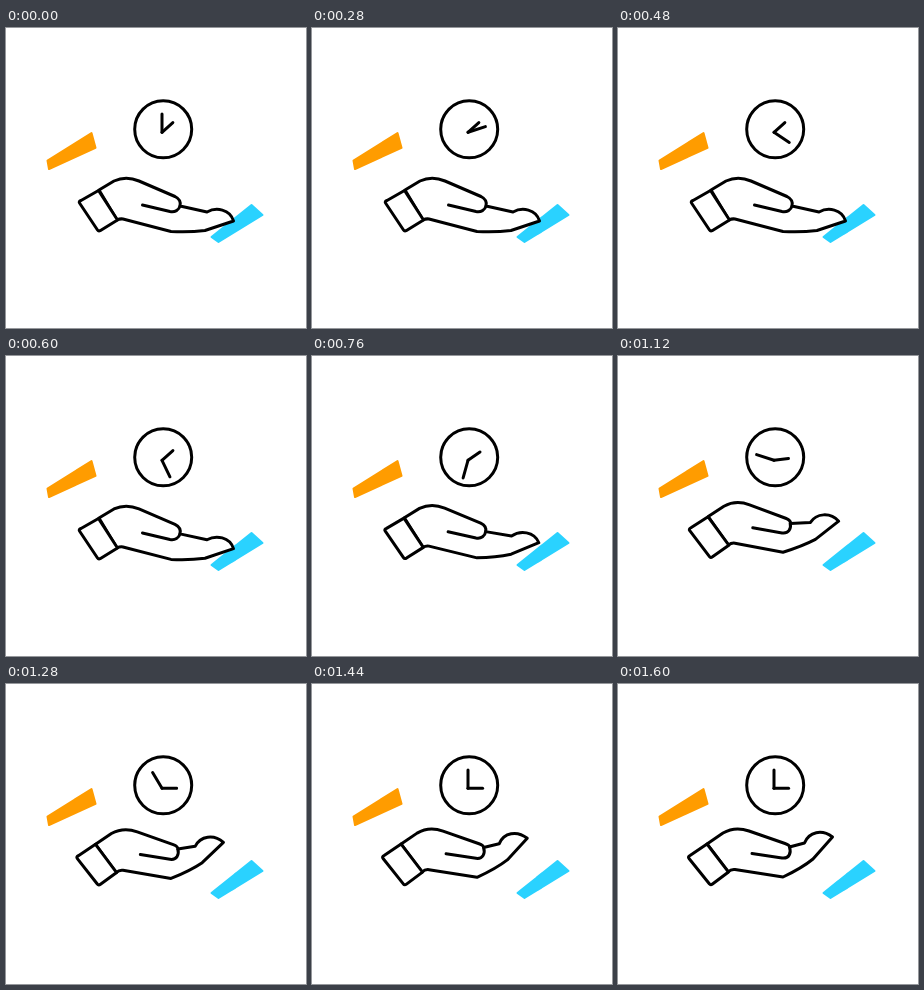
Write an HTML page that moves like this. It is 300 px wide and 300 px high and loops after 1640 ms.

```html
<!DOCTYPE html>
<html lang="en">
<head>
<meta charset="utf-8">
<title>Clock above a hand</title>
<style>
  html, body { margin: 0; width: 100%; height: 100%; overflow: hidden; background: #fff; }
  svg { display: block; width: 100vw; height: 100vh; }
  .line { stroke: #000; stroke-width: 3; stroke-linecap: round; stroke-linejoin: round; }
</style>
</head>
<body>
<svg viewBox="0 0 300 300">
  <g stroke-width="2" stroke-linejoin="round">
    <path fill="#ff9c00" stroke="#ff9c00" d="M41.5 132.5L85.5 105L89.5 119.8L43 141Z"/>
    <path fill="#2ad2ff" stroke="#2ad2ff" d="M205.5 209L212.5 214L256.5 187L245.5 177Z"/>
  </g>
  <g class="line" fill="#fff">
    <path id="palm"/>
    <path id="thumb" fill="none"/>
    <path id="cuff"/>
    <circle cx="157.2" cy="101.3" r="28.5"/>
    <path id="hour" d="M156 104.3V89.7"/>
    <path id="minute" d="M156 104.3V86"/>
  </g>
</svg>
<script>
const LOOP = 1640, STEP = 40;
const el = id => document.getElementById(id);
const clamp = v => Math.min(1, Math.max(0, v));
const smooth = u => u * u * (3 - 2 * u);

// Each part: lowered pose, raised pose
const poses = {
  palm: [
    "M93 162L108 153Q120 147.5 133 153L169 168.5C173 170.5 175 174 174 178L201 184C210 179 224 181 227.5 193L199 202.5Q183 204.5 165 203.5L117 191Q114 190.5 111 192Z",
    "M89 160L105 149Q117 142 131 147L167 159.5C170 160.5 172 162 171.5 163L186.5 159C191 147.5 204 145 214.5 153L195 175Q184 184 165 193L117 185.5Q113 185 110 188Z"
  ],
  thumb: [
    "M174 178C173 182 169 184.5 164 183.5L136.5 177",
    "M171.5 163C173.5 169 171 175 164 174L134 169.5"
  ],
  cuff: [
    "M75 172.5L92.5 162.5L111.5 192L94.5 202.5Q92.5 203.5 91.5 202L73.5 175Q72.5 173.5 75 172.5Z",
    "M72 171.5L89 160L110.5 188L94.5 200Q92.5 201.5 91.5 200L71 174.5Q69.5 173 72 171.5Z"
  ]
};

function blend(id, p) {
  const [low, high] = poses[id];
  const to = high.match(/[\d.]+/g);
  let i = 0;
  return low.replace(/[\d.]+/g, n => {
    const isX = i % 2 === 0;
    let v = +n + (to[i++] - n) * p;
    // fingers swing on an arc
    if (isX && id === "palm" && n > 176) v += 4 * p * (1 - p) * 2.6 * (n - 165) / 62;
    return v.toFixed(2);
  });
}

// cubic-bezier(.25, 0, .5, 1)
function ease(u) {
  let a = 0, b = 1, s = u;
  for (let k = 0; k < 24; k++) {
    s = (a + b) / 2;
    const x = 0.75 * s * (1 - s) ** 2 + 1.5 * s * s * (1 - s) + s ** 3;
    if (x < u) a = s; else b = s;
  }
  return s * s * (3 - 2 * s);
}

function turn(id, deg) {
  el(id).setAttribute("transform", `rotate(${deg} 156 104.3)`);
}

function draw(t) {
  const lift = ease(clamp((t - 560) / 1040));
  for (const id in poses) el(id).setAttribute("d", blend(id, lift));
  turn("minute", 360 * clamp(t / 1400));
  turn("hour", 48 + 42 * smooth(clamp((t - 560) / 760)));
}

const start = performance.now();
function tick() {
  const t = (performance.now() - start) % LOOP;
  draw(Math.floor(t / STEP) * STEP);
  requestAnimationFrame(tick);
}
draw(0);
requestAnimationFrame(tick);
</script>
</body>
</html>
```
